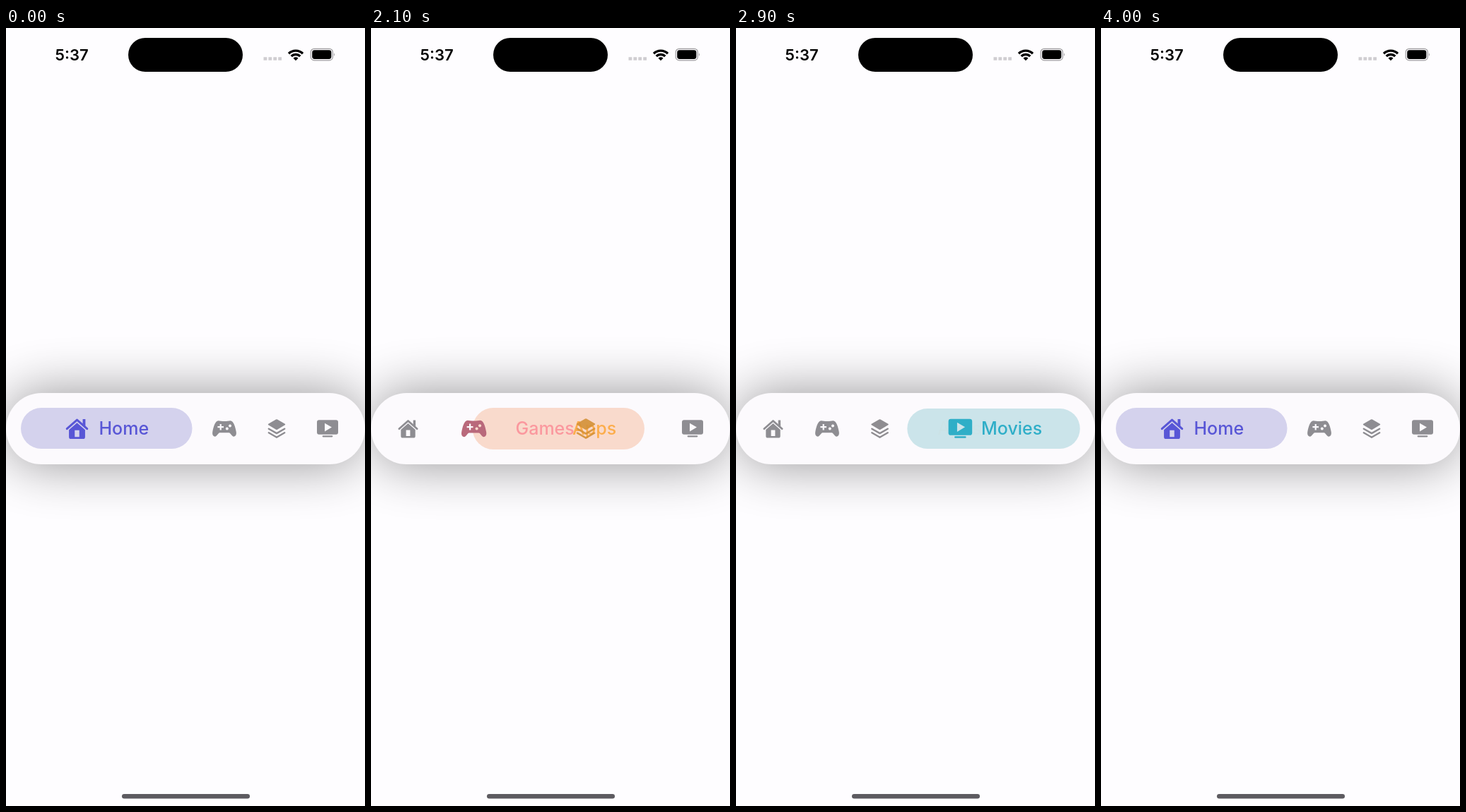
These frames come from a looping animation (508x1102 px, 4.1 s). An HTML page:

```html
<!DOCTYPE html>
<html lang="en">
<head>
<meta charset="utf-8">
<title>Tab bar</title>
<style>
  html, body { margin: 0; width: 100%; height: 100%; overflow: hidden; background: #fefdff; }
  svg { display: block; width: 100vw; height: 100vh; }
  text { font-family: Inter, Roboto, sans-serif; }
  .label { font-size: 25px; font-weight: 500; }
  .clock { font-size: 22px; font-weight: 600; }
  .shadow { filter: blur(38px); opacity: .42; }
</style>
</head>
<body>
<svg viewBox="0 0 508 1102">
  <defs>
    <g id="home">
      <path d="M-12.7 .2L0 -11L12.7 .2" fill="none" stroke="currentColor" stroke-width="2.7" stroke-linecap="round" stroke-linejoin="round"/>
      <path d="M7.2 -12H10.6V-3L7.2 -6Z"/>
      <path fill-rule="evenodd" d="M0 -7.4L10.2 1.6V10.4Q10.2 13 7.6 13H-7.6Q-10.2 13 -10.2 10.4V1.6ZM-2.9 2V10.4H2.9V2Z"/>
    </g>
    <path id="games" fill-rule="evenodd" d="M-8.5 -11.3C-4 -10.4 4 -10.4 8.5 -11.3C13 -11 15.5 -3 16.8 5C17.3 9 15.5 11.2 13.2 11.2C10.5 11.2 9 6.2 6.5 5.8H-6.5C-9 6.2 -10.5 11.2 -13.2 11.2C-15.5 11.2 -17.3 9 -16.8 5C-15.5 -3 -13 -11 -8.5 -11.3ZM-6.4 -6.6V-3.4H-9.6V-1.2H-6.4V2H-4.2V-1.2H-1V-3.4H-4.2V-6.6ZM8 -6a2 2 0 1 0 .01 0ZM3.8 -2a2 2 0 1 0 .01 0Z"/>
    <g id="apps">
      <path d="M-1 -13Q0 -13.6 1 -13L11.8 -6.8Q12.8 -6 11.8 -5.2L1 1.2Q0 1.8 -1 1.2L-11.8 -5.2Q-12.8 -6 -11.8 -6.8Z"/>
      <path d="M-11.2 .2L0 6.6L11.2 .2M-11.2 5.8L0 12.2L11.2 5.8" fill="none" stroke="currentColor" stroke-width="2.4" stroke-linecap="round" stroke-linejoin="round"/>
    </g>
    <path id="movies" fill-rule="evenodd" d="M-12 -12.2H12Q15 -12.2 15 -9.2V5.3Q15 8.3 12 8.3H-12Q-15 8.3 -15 5.3V-9.2Q-15 -12.2 -12 -12.2ZM-4 -7.8V4L6 -1.9ZM-6.3 9.7H6.3A1.1 1.1 0 0 1 6.3 11.9H-6.3A1.1 1.1 0 0 1 -6.3 9.7Z"/>
  </defs>

  <rect width="508" height="1102" fill="#fefdff"/>

  <text class="clock" x="69.5" y="46">5:37</text>
  <rect x="173" y="14" width="162" height="48" rx="24"/>
  <path d="M364.5 43.5H390" stroke="#cfcdd1" stroke-width="4.6" stroke-dasharray="4.8 2.1"/>
  <g fill="none" stroke="#000" stroke-width="3.4">
    <path d="M400 36.2A14.2 14.2 0 0 1 420 36.2M403.7 40A9 9 0 0 1 416.3 40"/>
    <path d="M410 46.3L406.5 42.7A5 5 0 0 1 413.5 42.7Z" fill="#000" stroke="none"/>
  </g>
  <rect x="431.2" y="29.3" width="31.2" height="16.6" rx="5" fill="none" stroke="#9d9b9f" stroke-width="1.2"/>
  <rect x="433.2" y="31.3" width="27.2" height="12.6" rx="3.4"/>
  <path d="M464 35.2Q466 37.6 464 40Z" fill="#9d9b9f"/>

  <rect class="shadow" y="517" width="508" height="101" rx="50.5"/>
  <rect y="517" width="508" height="101" rx="50.5" fill="#fcfafd"/>
  <rect id="pill"/>
  <g id="tabs"></g>
  <rect x="164" y="1085" width="181" height="6.6" rx="3.3" fill="#5d5b60"/>
</svg>
<script>
const LOOP = 4100, STEP = 100, DURATION = 350, MID_Y = 567.5;
const GRAY = [142, 141, 146];

// pill: left, right, top, bottom; icons: centre x of each icon while this tab is active
const tabs = [
  { id: 'home', label: 'Home', textX: 131.5, color: [88, 86, 214], fill: [212, 210, 237],
    pill: [21, 263.5, 538, 596], icons: [100.5, 309, 383, 455] },
  { id: 'games', label: 'Games', textX: 204.5, color: [255, 45, 85], fill: [252, 209, 216],
    pill: [93, 345, 539, 596], icons: [52.5, 173, 383, 455] },
  { id: 'apps', label: 'Apps', textX: 285, color: [255, 147, 0], fill: [247, 223, 197],
    pill: [174.5, 412.5, 537.5, 597.5], icons: [52.5, 129, 256, 455] },
  { id: 'movies', label: 'Movies', textX: 347, color: [46, 174, 200], fill: [203, 228, 234],
    pill: [243, 487.5, 539, 596], icons: [52.5, 129, 203, 316] }
];

// start time, tab left, tab entered
const moves = [[1316, 0, 1], [1900, 1, 2], [2575, 2, 3], [3569, 3, 0]];

const lerp = (a, b, p) => a + (b - a) * p;
const mix = (a, b, p) => a.map((v, i) => lerp(v, b[i], p));
const rgb = c => `rgb(${c.map(Math.round)})`;

function make(name, attrs, parent) {
  const el = document.createElementNS('http://www.w3.org/2000/svg', name);
  set(el, attrs);
  return parent.appendChild(el);
}
function set(el, attrs) {
  for (const key in attrs) el.setAttribute(key, attrs[key]);
}

// cubic-bezier(.42, 0, .58, 1)
function easeInOut(u) {
  if (u <= 0 || u >= 1) return u <= 0 ? 0 : 1;
  let lo = 0, hi = 1;
  for (let i = 0; i < 24; i++) {
    const s = (lo + hi) / 2, r = 1 - s;
    if (1.26 * s * r * r + 1.74 * s * s * r + s * s * s < u) lo = s; else hi = s;
  }
  return lo * lo * (3 - 2 * lo);
}

const pill = document.getElementById('pill');
const group = document.getElementById('tabs');
for (const tab of tabs) {
  tab.text = make('text', { class: 'label', x: tab.textX, y: 576.3, fill: rgb(tab.color) }, group);
  tab.text.textContent = tab.label;
}
for (const tab of tabs) tab.icon = make('use', { href: '#' + tab.id }, group);

function draw(time) {
  const [start, from, to] = moves.filter(m => m[0] <= time).pop() || [-LOOP, 3, 0];
  const p = easeInOut((time - start) / DURATION);
  const a = tabs[from], b = tabs[to];

  const [left, right, top, bottom] = mix(a.pill, b.pill, p);
  set(pill, { x: left, y: top, width: right - left, height: bottom - top,
              rx: (bottom - top) / 2, fill: rgb(mix(a.fill, b.fill, p)) });

  tabs.forEach((tab, i) => {
    const active = i === to ? p : i === from ? 1 - p : 0;
    const x = lerp(a.icons[i], b.icons[i], p);
    // the entering icon thins out briefly while it cross-fades
    const dip = i === to ? .82 * (1 - p) ** 2 * Math.cbrt(p) : 0;
    const color = rgb(mix(GRAY, tab.color, active));
    set(tab.icon, { transform: `translate(${x} ${MID_Y}) scale(${1 + .12 * active})`,
                    fill: color, color, opacity: 1 - dip });
    set(tab.text, { opacity: active });
  });
}

function tick() {
  const time = performance.now() % LOOP;
  draw(Math.floor(time / STEP) * STEP);
  requestAnimationFrame(tick);
}
tick();
</script>
</body>
</html>
```
